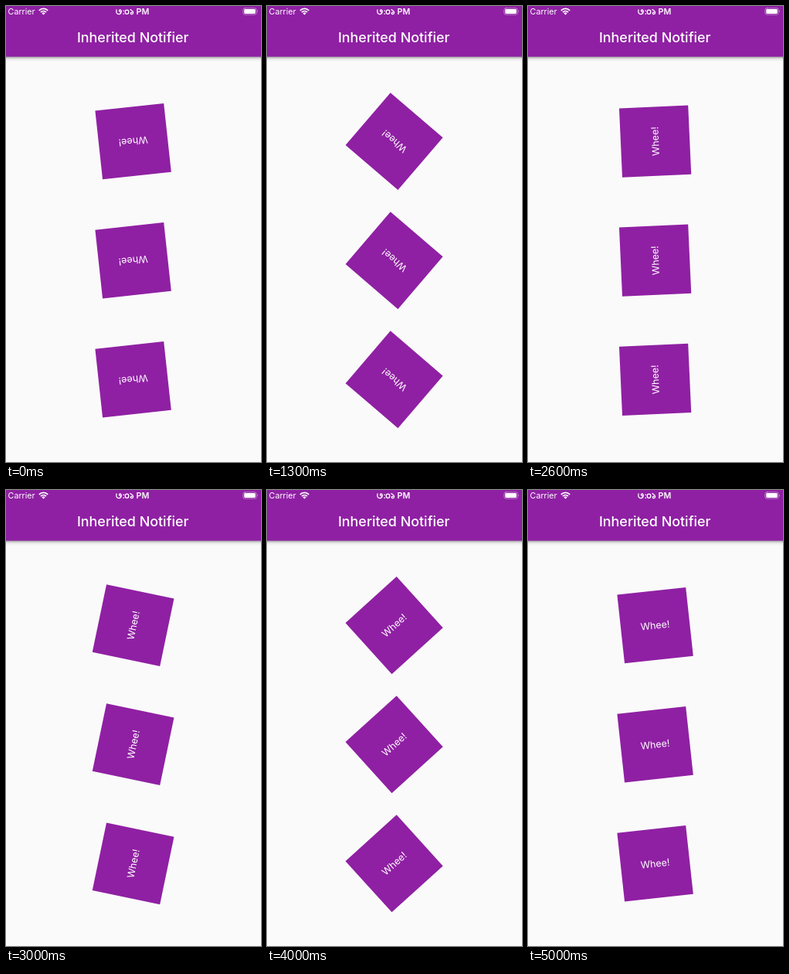
An HTML page that plays this animation: 330 px wide and 590 px high, repeating every 5100 ms.

```html
<!DOCTYPE html>
<html lang="en">
<head>
<meta charset="utf-8">
<title>Inherited Notifier</title>
<style>
  html, body { margin: 0; width: 100%; height: 100%; overflow: hidden; background: #fafafa; }
  svg { display: block; font-family: Inter, sans-serif; fill: #fff; }
  .purple { fill: #8f20a3; }
  .bar { filter: drop-shadow(0 1px 1px #0004) drop-shadow(0 2px 2px #0003); }
  .title { font-size: 17.9px; font-weight: 500; }
  .status { font-size: 10.7px; }
  .clock { font-weight: 600; }
  .label { font-size: 12.5px; }
  .line { fill: none; stroke: #fff; stroke-linecap: round; }
  .middle { text-anchor: middle; }
</style>
</head>
<body>
<svg width="330" height="590" viewBox="0 0 330 590">
  <defs>
    <g id="spinner">
      <rect class="purple" x="-44.65" y="-44.65" width="89.3" height="89.3"/>
      <text class="label middle" y="4.5">Whee!</text>
    </g>
  </defs>
  <rect class="purple bar" x="-20" y="-20" width="370" height="85.6"/>
  <text class="title middle" x="164.2" y="47.2">Inherited Notifier</text>

  <g class="status">
    <text x="2.6" y="11">Carrier</text>
    <g class="line" style="stroke-width: 1.8; stroke-linecap: butt">
      <path d="M42.8 5.8A8.1 8.1 0 0 1 54.2 5.8M45 8A5 5 0 0 1 52 8"/>
    </g>
    <path d="M48.5 11.6L46.4 9.4A3 3 0 0 1 50.6 9.4Z"/>
    <g class="clock">
      <!-- Bengali digits 3, 0 and 1 -->
      <path class="line" stroke-width="1.3" aria-label="৩:০১"
        d="M143 5C142.2 9 144 10.9 146.4 10.5C149.8 10 150 5 147.6 5C146 5 146 7.6 148 7.5
           M154.2 7.8a2.3 2.6 0 1 0 4.6 0a2.3 2.6 0 1 0-4.6 0
           M161 4.6L162.6 5.7C165.4 7.3 165 10.6 162.8 10.6C160.8 10.6 161 8 163 8.3"/>
      <text x="150.6" y="11">:</text>
      <text x="168.6" y="11">PM</text>
    </g>
    <rect class="line" x="306.8" y="2.8" width="17.4" height="8.4" rx="2.4" stroke-opacity=".45" stroke-width=".9"/>
    <rect x="308.2" y="4.1" width="14.6" height="5.8" rx="1.3"/>
    <path d="M325.2 5.4Q326.6 7 325.2 8.6Z" fill-opacity=".6"/>
  </g>

  <use href="#spinner" class="spin" data-y="175.1"/>
  <use href="#spinner" class="spin" data-y="329.2"/>
  <use href="#spinner" class="spin" data-y="483.3"/>
</svg>
<script>
  const LOOP = 5100, STEP = 100;
  const START_ANGLE = 173.8, DEGREES_PER_SECOND = 36;
  const spinners = document.querySelectorAll('.spin');

  function draw(now) {
    const time = Math.floor(now % LOOP / STEP) * STEP;
    const angle = START_ANGLE + DEGREES_PER_SECOND * time / 1000;
    for (const s of spinners)
      s.setAttribute('transform', `translate(164.6 ${s.dataset.y}) rotate(${angle})`);
  }

  function tick() {
    draw(performance.now());
    requestAnimationFrame(tick);
  }
  tick();
</script>
</body>
</html>
```
